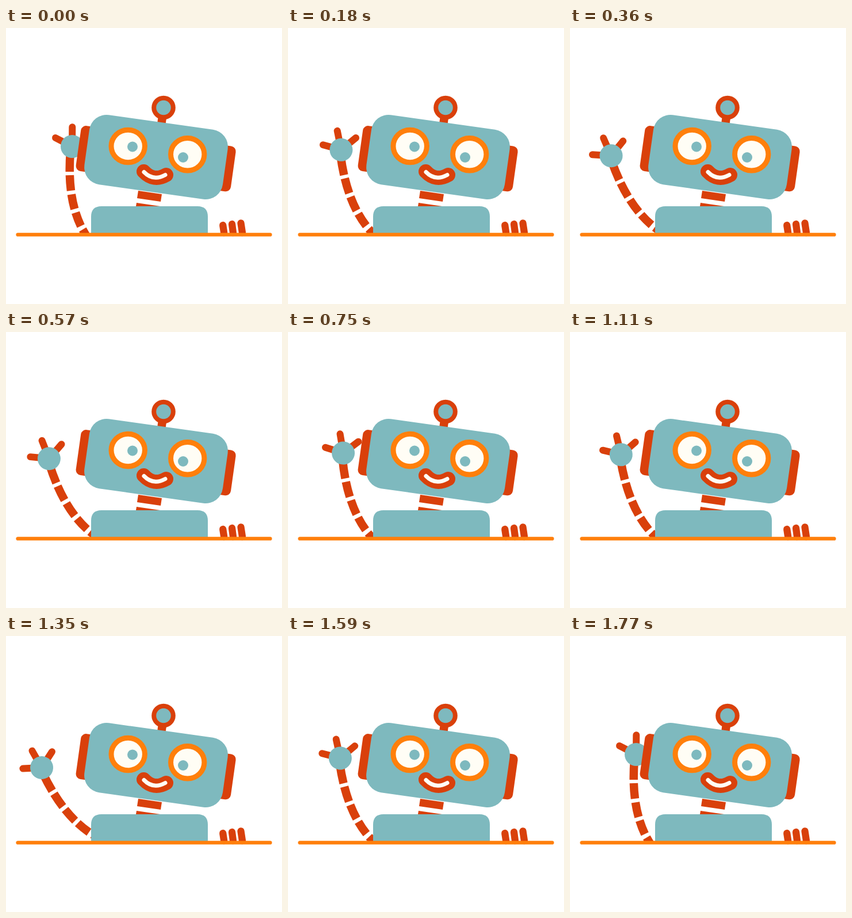
Write an HTML page that moves like this. It is 480 px wide and 480 px high and loops after 1.8 s.

```html
<!DOCTYPE html>
<html lang="en">
<head>
<meta charset="utf-8">
<title>Waving robot</title>
<style>
  html, body { margin: 0; width: 100%; height: 100%; overflow: hidden; background: #fff; }
  svg { display: block; width: 100vw; height: 100vh; }
  .teal { fill: #7eb9be; }
  .red { fill: #d9400b; }
  .line { fill: none; stroke: #d9400b; }
  .round { stroke-linecap: round; }
  .eye { fill: #fffdf5; stroke: #ff7f0b; stroke-width: 9; }
</style>
</head>
<body>
<svg viewBox="0 0 480 480">
  <clipPath id="aboveTable"><rect width="480" height="357"/></clipPath>

  <g clip-path="url(#aboveTable)">
    <g id="arm">
      <path class="line" stroke-width="14.5" stroke-dasharray="35 6 27 6.5 26 6.5 25 7 40"
            d="M112 215C108 265 113 312 133 350L147 374"/>
      <path class="line round" stroke-width="12" d="M115 206L86 191M115 206L115.3 172.3M115 206L144.4 191"/>
      <circle class="teal" cx="115" cy="206" r="20"/>
    </g>
  </g>

  <!-- neck -->
  <path class="red" d="M230 283L271 289L269 302L228 296ZM227 304L268 310L267 316L225 316Z"/>

  <!-- antenna -->
  <path class="line" stroke-width="14.5" d="M274 138.5L270.2 168"/>
  <circle class="teal" cx="274" cy="138.5" r="16.8" stroke="#d9400b" stroke-width="8"/>

  <!-- head -->
  <g transform="translate(261 224.5) rotate(8)">
    <rect class="red" x="-136" y="-37" width="272" height="79.5" rx="9"/>
    <rect class="teal" x="-121.5" y="-61" width="243" height="122" rx="30"/>
  </g>
  <ellipse class="eye" cx="212.2" cy="205.5" rx="29.2" ry="28.2"/>
  <circle class="teal" cx="220" cy="206.5" r="9"/>
  <ellipse class="eye" cx="315.7" cy="219.7" rx="29.2" ry="28.2"/>
  <circle class="teal" cx="308" cy="225" r="9"/>
  <path class="line round" stroke-width="25" d="M239.5 249.5Q257 268 278.5 255.5"/>
  <path class="round" fill="none" stroke="#fffdf5" stroke-width="7" d="M240 250.5Q256 267 277 255.5"/>

  <!-- body, resting fingers, table -->
  <path class="teal" d="M148 358V328Q148 310 166 310H333Q351 310 351 328V358Z"/>
  <path class="line round" stroke-width="12.3" d="M377.2 343L379.2 356M393 341L395 356M408.5 339.3L411 356"/>
  <path class="round" stroke="#ff7f0b" stroke-width="6.2" d="M20.5 359.4H459.5"/>
</svg>
<script>
  const LOOP = 1800, STEP = 30, SWING = 30;
  const PIVOT = "131.4 316.3";
  // [time, swing amount]: two steady waves, with a short hold at the end
  const KEYS = [[0, 0], [450, 1], [900, 0], [1350, 1], [1770, 0], [1800, 0]];
  const arm = document.getElementById("arm");

  function swingAt(t) {
    const i = KEYS.findIndex(k => k[0] > t);
    const [t0, a] = KEYS[i - 1], [t1, b] = KEYS[i];
    return a + (b - a) * (t - t0) / (t1 - t0);
  }

  const start = performance.now();
  function draw() {
    const t = (performance.now() - start) % LOOP;
    const angle = -SWING * swingAt(Math.floor(t / STEP) * STEP);
    arm.setAttribute("transform", `rotate(${angle} ${PIVOT})`);
    requestAnimationFrame(draw);
  }
  draw();
</script>
</body>
</html>
```
